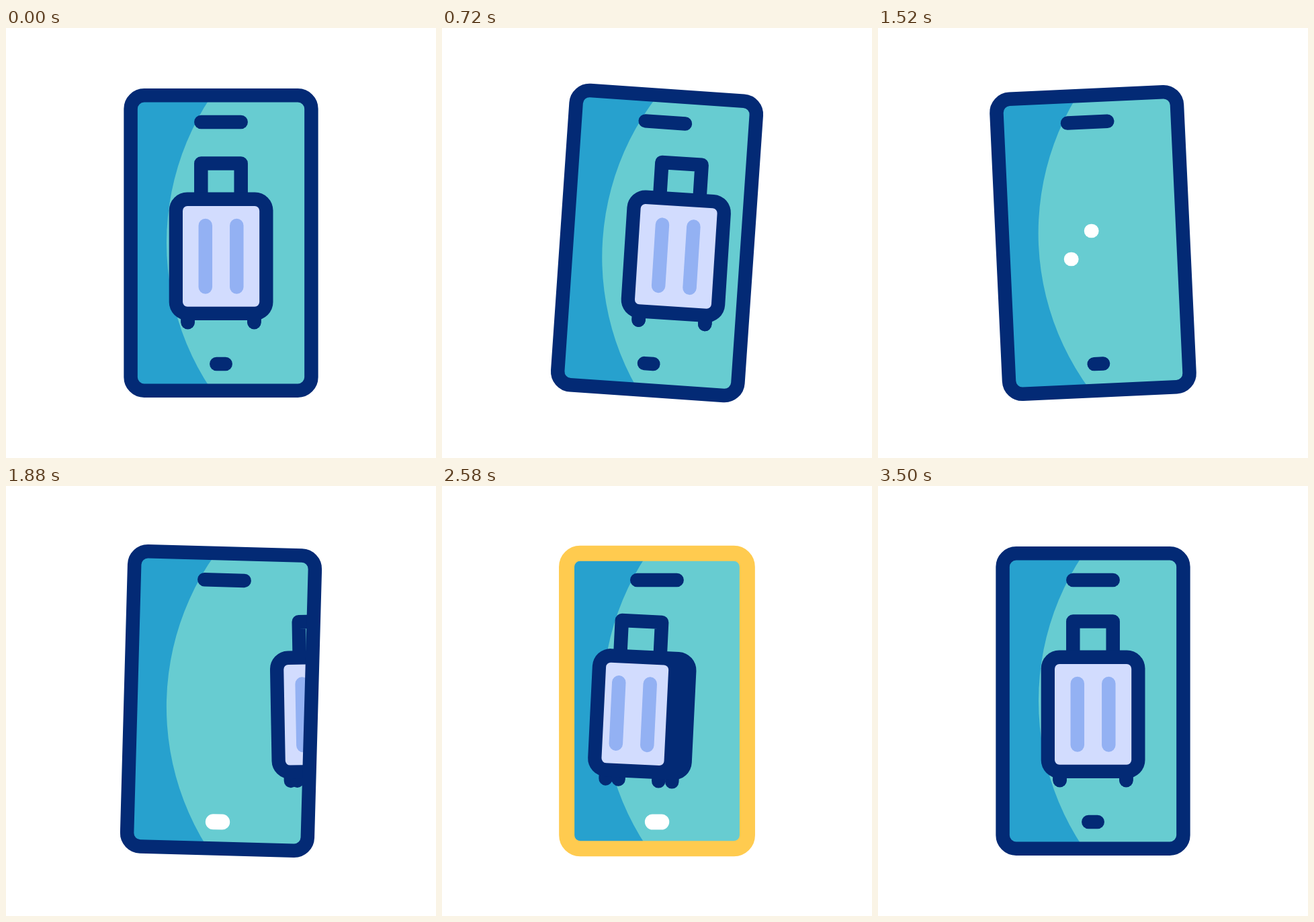
These frames come from a looping animation (640x640 px, 3.6 s). An HTML page with a canvas:

```html
<!DOCTYPE html>
<html lang="en">
<head>
<meta charset="utf-8">
<title>Travel app</title>
<style>
  html, body { margin: 0; width: 100%; height: 100%; overflow: hidden; background: #fff; }
  canvas { display: block; width: 640px; height: 640px; }
</style>
</head>
<body>
<canvas id="stage" width="640" height="640"></canvas>
<script>
const ctx = document.getElementById('stage').getContext('2d');
const LOOP = 3600;
const STROKE = 20.5;
const HIGHLIGHT = 23;
const NAVY = '#032a75', BLUE = '#27a1ce', TEAL = '#67ccd1', YELLOW = '#ffcb4f';
const PANEL = '#d2dcfe', STRIPE = '#93b1f3', WHITE = '#fff';

// Phone outline, measured on the centre of its stroke
const FRAME = { left: 185.6, top: 100.3, right: 454.4, bottom: 539.7, radius: 20, startX: 326 };
const FRAME_LENGTH = 2 * (FRAME.right - FRAME.left + FRAME.bottom - FRAME.top)
  - (8 - 2 * Math.PI) * FRAME.radius;

const clamp = v => Math.min(1, Math.max(0, v));
const smooth = p => p * p * (3 - 2 * p);
const ease = (t, from, to, power = 1) => smooth(clamp((t - from) / (to - from)) ** power);

// Keys are [time, value, power]; the power skews the ease that leads to the key
function track(t, keys) {
  let value = keys[0][1];
  for (let i = 1; i < keys.length; i++) {
    const [from, start] = keys[i - 1];
    const [to, end, power] = keys[i];
    if (t < from) break;
    value = start + (end - start) * ease(t, from, to, power);
  }
  return value;
}

function phoneTilt(t) {
  if (t < 1665) return track(t, [[0, 0], [600, 4], [1430, -4, 1.5], [1665, 0]]);
  return t < 3495 ? 2 * Math.sin(Math.PI * (t - 1665) / 305) : 0;
}

function caseePose(t) {
  if (t < 1480) {
    return {
      x: track(t, [[0, 0], [640, 29.5], [690, 29.5], [1435, -230]]),
      tilt: track(t, [[0, 0], [640, 3.7], [690, 3.7], [1435, -4.3]]),
      turn: 0
    };
  }
  return {
    x: track(t, [[1492, 230], [2540, -22.3], [2580, -22.3], [3060, 0]]),
    tilt: track(t, [[1492, -2.8], [2540, 2.8], [2580, 2.8], [3060, 0]]),
    turn: track(t, [[1492, 0.28], [2540, 1], [2580, 1], [3060, 0]])
  };
}

function stroke(color, width = STROKE) {
  ctx.strokeStyle = color;
  ctx.lineWidth = width;
  ctx.stroke();
}

function line(color, points, width) {
  ctx.beginPath();
  points.forEach(([x, y]) => ctx.lineTo(x, y));
  stroke(color, width);
}

function box(color, x, y, w, h, r) {
  ctx.beginPath();
  ctx.roundRect(x, y, w, h, r);
  ctx.fillStyle = color;
  ctx.fill();
}

function rotateAbout(x, y, degrees) {
  ctx.translate(x, y);
  ctx.rotate(degrees * Math.PI / 180);
  ctx.translate(-x, -y);
}

// Part of a straight horizontal line, between two fractions of its length
function trimmedLine(color, x1, x2, y, from, to, width) {
  if (to <= from) return;
  const at = p => x1 + (x2 - x1) * p;
  line(color, [[at(from), y], [at(to), y]], width);
}

function traceFrame() {
  const { left, top, right, bottom, radius, startX } = FRAME;
  ctx.beginPath();
  ctx.moveTo(startX, bottom);
  ctx.arcTo(left, bottom, left, top, radius);
  ctx.arcTo(left, top, right, top, radius);
  ctx.arcTo(right, top, right, bottom, radius);
  ctx.arcTo(right, bottom, left, bottom, radius);
  ctx.closePath();
}

function drawScreen(t) {
  ctx.fillStyle = BLUE;
  ctx.fillRect(180, 95, 280, 450);
  ctx.beginPath();
  ctx.arc(631, 320, 392, 0, Math.PI * 2);
  ctx.fillStyle = TEAL;
  ctx.fill();
  line(NAVY, [[290.3, 140], [349.7, 140]]);
  line(NAVY, [[313.3, 500], [326.7, 500]]);
  trimmedLine(WHITE, 313.3, 326.7, 500, ease(t, 2700, 3000), ease(t, 1640, 1860), HIGHLIGHT);
}

function drawSpeedLines(t) {
  const from = ease(t, 1280, 1540);
  const to = ease(t, 1120, 1400);
  trimmedLine(WHITE, 407, 317, 302, from, to);
  trimmedLine(WHITE, 377, 287, 344, from, to);
}

function drawSuitcase({ x, tilt, turn }) {
  ctx.save();
  ctx.translate(x, 0);
  rotateAbout(320, 340, tilt);
  const handle = -7 * turn;
  line(NAVY, [[290.3, 255], [290.3, 201.6], [349.7, 201.6], [349.7, 255]].map(([a, b]) => [a + handle, b]));
  for (const wheel of [270.6, 270.6 + 19 * turn, 369.4 - 20 * turn, 369.4]) {
    line(NAVY, [[wheel, 428], [wheel, 438]]);
  }
  box(NAVY, 242.7, 244.5, 154.8, 190.5, 27);
  box(PANEL, 263, 265, 114.2 - 21 * turn, 149.7, 7);
  for (const stripe of [296.8, 343.3]) {
    const sx = stripe - 13.5 * turn;
    line(STRIPE, [[sx, 294], [sx, 385.5]]);
  }
  ctx.restore();
}

function drawFrame(t) {
  traceFrame();
  stroke(NAVY);
  const from = ease(t, 2620, 3120) * FRAME_LENGTH;
  const to = ease(t, 1980, 2540) * FRAME_LENGTH;
  if (to <= from) return;
  traceFrame();
  if (to - from < FRAME_LENGTH - 0.5) {
    ctx.setLineDash([to - from, FRAME_LENGTH * 2]);
    ctx.lineDashOffset = -from;
  }
  stroke(YELLOW, HIGHLIGHT);
  ctx.setLineDash([]);
}

function draw(t) {
  const tilt = phoneTilt(t);
  ctx.fillStyle = WHITE;
  ctx.fillRect(0, 0, 640, 640);
  ctx.lineCap = ctx.lineJoin = 'round';

  ctx.save();
  rotateAbout(320, 320, tilt);
  ctx.save();
  traceFrame();
  ctx.clip();
  drawScreen(t);
  rotateAbout(320, 320, -tilt);
  drawSpeedLines(t);
  drawSuitcase(caseePose(t));
  ctx.restore();
  drawFrame(t);
  ctx.restore();
}

const start = performance.now();
function tick() {
  draw((performance.now() - start) % LOOP);
  requestAnimationFrame(tick);
}
tick();
</script>
</body>
</html>
```
